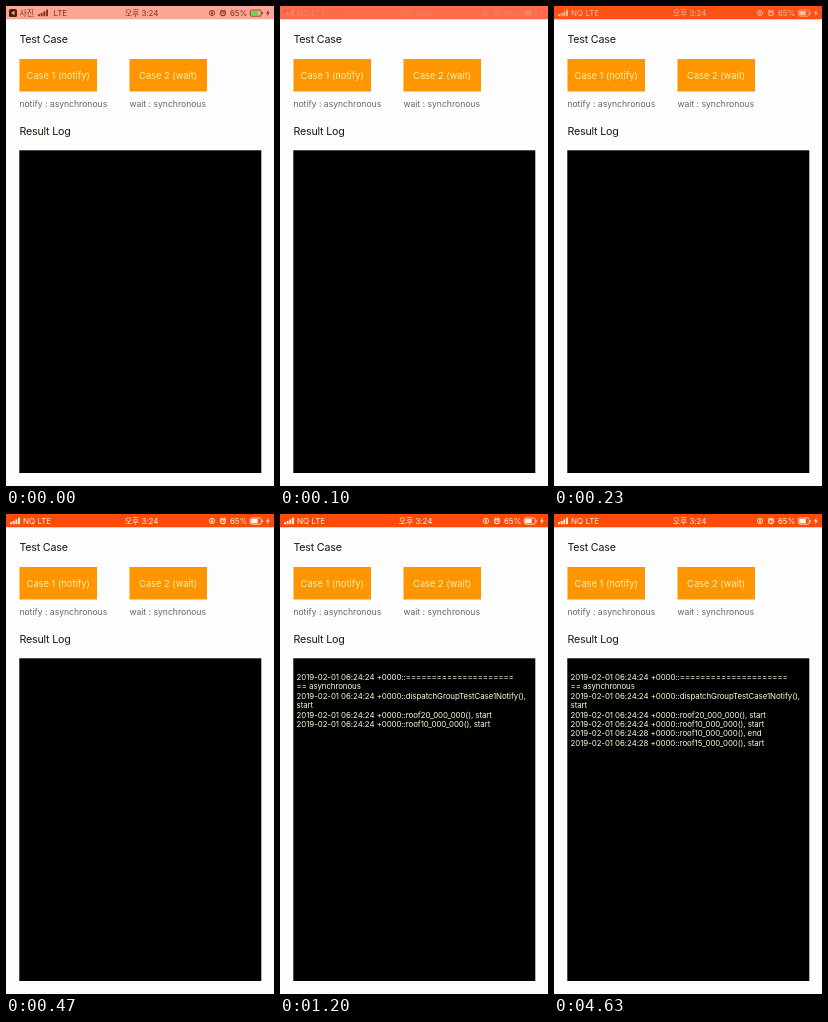
Write an HTML page that moves like this. It is 268x480 px and loops after 8 s.

```html
<!DOCTYPE html>
<html lang="ko">
<head>
<meta charset="utf-8">
<title>Dispatch group test</title>
<style>
  html, body { margin: 0; width: 100%; height: 100%; overflow: hidden; background: #fdfdfd; }
  svg { display: block; width: 100vw; height: 100vh; }
  text { font-family: Inter, Roboto, "Noto Sans CJK KR", "Noto Sans CJK", sans-serif; white-space: pre; }
  .head { font-size: 10.7px; letter-spacing: -.2px; fill: #17170a; }
  .button { font-size: 9.3px; fill: #fff0a4; text-anchor: middle; }
  .caption { font-size: 8.6px; fill: #66665a; }
  .status text { font-size: 8px; letter-spacing: -.1px; }
  .log { font-size: 7.87px; letter-spacing: -.06px; fill: #fffbd8; }
</style>
</head>
<body>
<svg viewBox="0 0 268 480" preserveAspectRatio="none">
  <defs>
    <g id="signal" fill="currentColor">
      <rect y="4.6" width="1.9" height="2"/>
      <rect x="2.7" y="3.4" width="1.9" height="3.2"/>
      <rect x="5.4" y="1.8" width="1.9" height="4.8"/>
      <rect x="8.1" width="1.9" height="6.6"/>
    </g>
    <g id="right" fill="none" stroke="currentColor" stroke-width=".8">
      <circle cx="206" cy="7" r="2.7"/>
      <rect x="205" y="6.6" width="2" height="1.7" fill="currentColor" stroke="none"/>
      <path d="M205.4 6.8V6a.6.6 0 0 1 1.2 0v.8" stroke-width=".5"/>
      <circle cx="217" cy="7.3" r="2.4" stroke-width="1.1"/>
      <path d="M214.2 5l1.4-1.3M219.8 5l-1.4-1.3M217 5.8v1.6h1.2"/>
      <rect x="244.3" y="4" width="11" height="6.2" rx="1.4"/>
      <path d="M256.4 6v2.2"/>
      <path d="M262.6 3.4l-2.6 4h1.8l-.6 3.2 2.6-4.2H262z" fill="currentColor" stroke="none"/>
    </g>
  </defs>

  <rect width="268" height="480" fill="#fdfdfd"/>
  <rect id="bar" width="268" height="13.3"/>

  <g id="before" class="status" color="#7c3024" fill="#7c3024">
    <rect x="3" y="3" width="8" height="8" rx="1.6" fill="#4d2110"/>
    <path d="M8.5 4.8v4.4L5.2 7z" fill="#fbb09c"/>
    <text x="13.5" y="10">사진</text>
    <use href="#signal" x="32" y="3.6"/>
    <text x="47.5" y="10">LTE</text>
    <text x="135.5" y="10" text-anchor="middle">오후 3:24</text>
    <text x="224" y="10">65%</text>
    <use href="#right"/>
    <rect x="245.2" y="4.9" width="6.6" height="4.4" rx=".6" fill="#68d850"/>
  </g>
  <g id="after" class="status" color="#fff3e4" fill="#fff3e4">
    <use href="#signal" x="4" y="3.6"/>
    <text x="17" y="10">NQ</text>
    <text x="31.5" y="10">LTE</text>
    <text x="135.5" y="10" text-anchor="middle">오후 3:24</text>
    <text x="224" y="10">65%</text>
    <use href="#right"/>
    <rect x="245.2" y="4.9" width="6.6" height="4.4" rx=".6"/>
  </g>

  <text class="head" x="13.4" y="37.3">Test Case</text>
  <rect x="13.5" y="53" width="77.5" height="32.5" fill="#ff9500"/>
  <rect x="123.5" y="53" width="77.5" height="32.5" fill="#ff9500"/>
  <text class="button" x="52.2" y="72.8">Case 1 (notify)</text>
  <text class="button" x="162.2" y="72.8">Case 2 (wait)</text>
  <text class="caption" x="13.4" y="100.7">notify : asynchronous</text>
  <text class="caption" x="123.4" y="100.7">wait : synchronous</text>
  <text class="head" x="13.4" y="128.8">Result Log</text>
  <rect x="13.3" y="144.3" width="242" height="322.7"/>
  <g id="log" class="log"></g>
</svg>
<script>
  const LOOP = 8000, STEP = 100 / 3;
  const $ = id => document.getElementById(id);

  // Each entry: time shown, seconds in its stamp, wrapped lines
  const entries = [
    [1070, 24, "=".repeat(21), "== asynchronous"],
    [1070, 24, "dispatchGroupTestCase1Notify(),", "start"],
    [1130, 24, "roof20_000_000(), start"],
    [1130, 24, "roof10_000_000(), start"],
    [4570, 28, "roof10_000_000(), end"],
    [4570, 28, "roof15_000_000(), start"]
  ];

  const rows = [];
  for (const [at, sec, first, ...rest] of entries) {
    const stamp = `2019-02-01 06:24:${sec} +0000::`;
    for (const line of [stamp + first, ...rest]) {
      const el = document.createElementNS("http://www.w3.org/2000/svg", "text");
      el.setAttribute("x", 16.6);
      el.setAttribute("y", 166 + 9.4 * rows.length);
      el.textContent = line;
      $("log").append(el);
      rows.push({ el, at });
    }
  }

  // Status bar fade: time, rgb, old opacity, new opacity
  const fade = [
    [0, 251, 166, 148, 1, 0],
    [100, 255, 108, 76, .08, .15],
    [200, 255, 80, 22, 0, .65],
    [300, 255, 75, 10, 0, 1]
  ];

  function fadeAt(t) {
    const i = fade.findIndex(k => k[0] > t);
    if (i < 0) return fade[fade.length - 1];
    const a = fade[i - 1], b = fade[i];
    const p = (t - a[0]) / (b[0] - a[0]);
    return a.map((v, n) => v + (b[n] - v) * p);
  }

  function draw(t) {
    const [, r, g, b, before, after] = fadeAt(Math.floor(t / STEP) * STEP);
    $("bar").setAttribute("fill", `rgb(${r},${g},${b})`);
    $("before").setAttribute("opacity", before);
    $("after").setAttribute("opacity", after);
    for (const { el, at } of rows) el.setAttribute("visibility", t >= at ? "visible" : "hidden");
  }

  const start = performance.now();
  function tick() {
    draw((performance.now() - start) % LOOP);
    requestAnimationFrame(tick);
  }
  tick();
</script>
</body>
</html>
```
